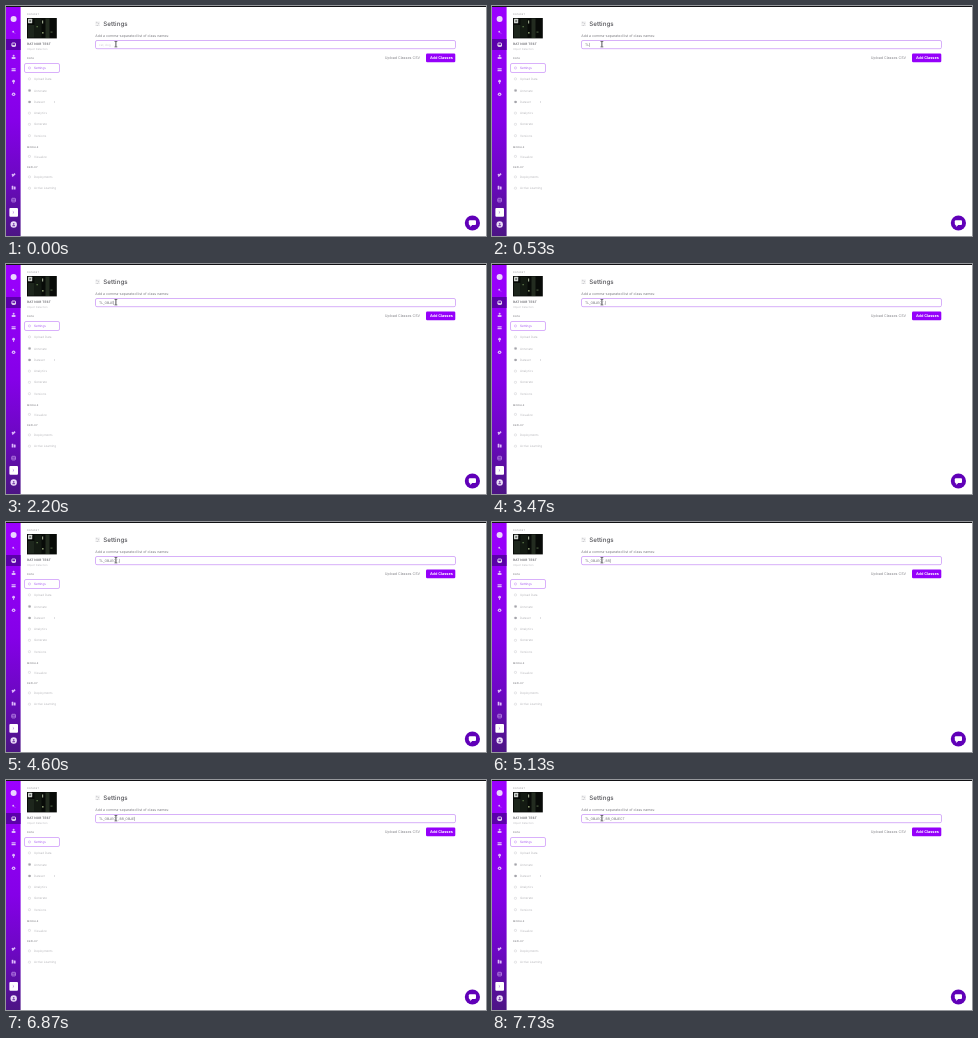
An HTML page with a canvas that plays this animation: 480x230 px, repeating every 8000 ms.

```html
<!DOCTYPE html>
<html lang="en">
<head>
<meta charset="utf-8">
<title>Settings</title>
<style>
  html, body { margin: 0; width: 100%; height: 100%; overflow: hidden; background: #fff; }
  canvas { display: block; width: 480px; height: 230px; }
</style>
</head>
<body>
<canvas id="stage"></canvas>
<script>
const W = 480, H = 230, LOOP = 8000;
const canvas = document.getElementById('stage');
const ctx = canvas.getContext('2d');
const ratio = window.devicePixelRatio || 1;
canvas.width = W * ratio;
canvas.height = H * ratio;

const PURPLE = '#9500fa', GREY = '#b8b8bc', TITLE = '#7f7f84';
const FULL = 'TL_OBJECT, BR_OBJECT';
// Time at which each character of FULL appears
const KEYS = [200, 530, 1000, 1670, 1870, 2000, 2200, 2330, 2600, 3070, 3470,
              5070, 5130, 5870, 6400, 6670, 6800, 6870, 7000, 7200];
// Spans in which the caret is dark
const CARET_OFF = [[0, 200], [1600, 1670], [4070, 4600], [5730, 5870], [7730, 8000]];

function text(str, x, y, size, color, weight = 400, spacing = 0) {
  ctx.font = `${weight} ${size}px Inter, "Open Sans", sans-serif`;
  ctx.letterSpacing = spacing + 'px';
  ctx.textRendering = 'geometricPrecision';
  ctx.fillStyle = color;
  ctx.fillText(str, x, y);
  return ctx.measureText(str).width;
}

function rect(x, y, w, h, color) {
  ctx.fillStyle = color;
  ctx.fillRect(x, y, w, h);
}

function box(x, y, w, h, r, fill, stroke, line = 0.7) {
  ctx.beginPath();
  ctx.roundRect(x, y, w, h, r);
  if (fill) { ctx.fillStyle = fill; ctx.fill(); }
  if (stroke) { ctx.strokeStyle = stroke; ctx.lineWidth = line; ctx.stroke(); }
}

function disc(x, y, r, color) {
  ctx.beginPath();
  ctx.arc(x, y, r, 0, Math.PI * 2);
  ctx.fillStyle = color;
  ctx.fill();
}

function line(color, width, ...pts) {
  ctx.beginPath();
  for (let i = 0; i < pts.length; i += 2) ctx.lineTo(pts[i], pts[i + 1]);
  ctx.strokeStyle = color;
  ctx.lineWidth = width;
  ctx.stroke();
}

function rail() {
  const g = ctx.createLinearGradient(0, 0, 0, H);
  g.addColorStop(0, '#9c00ff');
  g.addColorStop(0.5, '#8500e8');
  g.addColorStop(0.75, '#6c08c2');
  g.addColorStop(1, '#4c1584');
  rect(0, 1, 14.6, H - 1, g);
  rect(0, 33, 14.6, 11, '#5b00aa');

  const ink = '#dcb8fb';
  disc(7.6, 13, 3, '#ead3ff');
  disc(7.2, 25.7, 0.9, ink);
  line(ink, 0.6, 7.8, 26.3, 9, 27.5);
  box(5.9, 37, 3.6, 3.5, 0.6, null, '#fff', 0.8);
  line('#fff', 0.8, 5.9, 39.4, 9.5, 39.4);
  disc(7.6, 49.8, 1, ink);
  box(5.6, 51, 4, 1.9, 0.7, ink);
  box(5.5, 62.2, 4.2, 1.2, 0.3, ink);
  box(5.5, 64, 4.2, 1.2, 0.3, ink);
  disc(7.6, 75.2, 1.4, ink);
  line(ink, 0.9, 7.6, 75.2, 7.6, 78);
  disc(7.6, 88.3, 1.8, ink);
  disc(7.6, 88.3, 0.6, '#8b00f0');

  line(ink, 1.5, 6.2, 170.4, 9.1, 167.6);
  disc(6.4, 168.6, 0.8, ink);
  box(5.7, 179.8, 1.7, 3.7, 0.3, ink);
  box(7.8, 180.6, 1.8, 2.9, 0.3, ink);
  box(5.8, 192.3, 3.6, 3.6, 0.5, null, ink, 0.6);
  line(ink, 0.6, 5.8, 194.1, 9.4, 194.1);
  box(3.4, 202, 8.6, 8.8, 1, '#fff');
  line('#a86ae0', 0.6, 6.8, 205.4, 8, 206.4, 6.8, 207.4);
  disc(7.7, 218.5, 3.2, '#eadcf8');
  disc(7.7, 217.8, 0.9, '#7b45ac');
  box(6.3, 219.1, 2.8, 1.1, 0.6, '#7b45ac');
}

function thumbnail() {
  rect(21, 12, 29.8, 20.4, '#080b08');
  rect(22, 19, 6.5, 12.5, '#1d261c');
  rect(28.5, 13, 7, 18.5, '#131a12');
  rect(39.5, 12.5, 4, 19.5, '#232c20');
  rect(36, 14.5, 1.2, 3, '#9aa58c');
  rect(30.5, 20, 1.3, 1.3, '#5f7a4c');
  rect(36, 26, 1.6, 1.6, '#7f8e66');
  rect(44.5, 25.5, 2, 1.2, '#47583c');
  box(22, 12.8, 4.2, 4.4, 0.5, '#cfd3cf');
  box(23.2, 14, 1.9, 2, 0.3, '#777d78');
}

function menuItem(label, y) {
  box(22.4, y - 1.1, 2.1, 2, 0.6, null, '#cacace', 0.5);
  text(label, 28, y + 1, 3, GREY);
}

function group(label, y) {
  text(label, 21, y, 2.4, TITLE, 500, 0.25);
}

function panel() {
  text('DATASET', 21, 8.6, 2.4, '#98989c', 400, 0.25);
  thumbnail();
  text('RAT NOR TEST', 21, 39.4, 3.15, '#6a6a70', 600, 0.1);
  text('Object Detection', 21, 43.8, 2.6, '#bcbcc0');
  group('DATA', 52.8);
  box(18.5, 57.5, 35, 9, 1.5, '#fff', '#d9b0fb', 1);
  box(22.4, 60.9, 2.1, 2.1, 1, null, '#c48bf4', 0.5);
  text('Settings', 28, 63.1, 3.1, '#a95cf0');
  menuItem('Upload Data', 73);
  menuItem('Annotate', 84.5);
  menuItem('Dataset', 96);
  line('#b0b0b6', 0.5, 48.2, 95.2, 49, 96, 48.2, 96.8);
  menuItem('Analytics', 107.2);
  menuItem('Generate', 118.4);
  menuItem('Versions', 129.8);
  for (const y of [84.5, 96]) box(22.5, y - 0.9, 2.2, 1.8, 0.3, '#a4a4aa');
  group('MODELS', 141.8);
  menuItem('Visualize', 150.5);
  group('DEPLOY', 161.8);
  menuItem('Deployments', 171);
  menuItem('Active Learning', 182.3);
}

function heading() {
  for (const [y, k] of [[16.2, 90.8], [17.8, 92.5], [19.4, 91.2]]) {
    line('#cacace', 0.5, 89.4, y, 93.8, y);
    disc(k, y, 0.5, '#b8b8bc');
  }
  text('Settings', 97.3, 20.2, 6.2, '#505055', 500);
  text('Add a comma-separated list of class names:', 89.3, 30.7, 3.53, '#7d7d82');
}

function field(t) {
  box(89.5, 34.5, 360, 8.2, 1.5, '#fff', '#d3a8f9', 0.9);
  const typed = FULL.slice(0, KEYS.filter(k => k <= t).length);
  if (!typed) {
    text('cat, dog, …', 93, 39.8, 3, '#d2cdd8');
  } else {
    const end = 93 + text(typed, 93, 40, 3.36, '#707076');
    if (!CARET_OFF.some(([a, b]) => t >= a && t < b)) rect(end, 36.9, 0.4, 4, '#66666b');
  }
}

function pointer() {
  const x = 109.9;
  line('#fff', 1.7, x, 35.2, x, 41.2);
  line('#3f3f44', 0.9, x, 35.6, x, 40.8);
  for (const y of [35.5, 40.9]) line('#3f3f44', 0.7, x - 1.4, y, x + 1.4, y);
}

function actions() {
  text('Upload Classes CSV', 378.7, 53.2, 3.65, '#85858a');
  box(420, 47.5, 29.3, 8.8, 1.2, PURPLE);
  text('Add Classes', 423.9, 53.2, 3.75, '#fff', 700);
}

function chat() {
  disc(466.4, 217, 7.6, '#6000b8');
  box(462.8, 214.3, 7.2, 4.8, 1, '#fff');
  line('#fff', 1, 464.3, 218.8, 464.3, 220.2, 466, 218.8);
}

function draw(t) {
  ctx.setTransform(ratio, 0, 0, ratio, 0, 0);
  rect(0, 0, W, H, '#fff');
  rail();
  panel();
  heading();
  field(t);
  pointer();
  actions();
  chat();
  rect(0, 0, W, 1, '#111114');
}

const start = performance.now();
function tick() {
  draw((performance.now() - start) % LOOP);
  requestAnimationFrame(tick);
}
tick();
</script>
</body>
</html>
```
